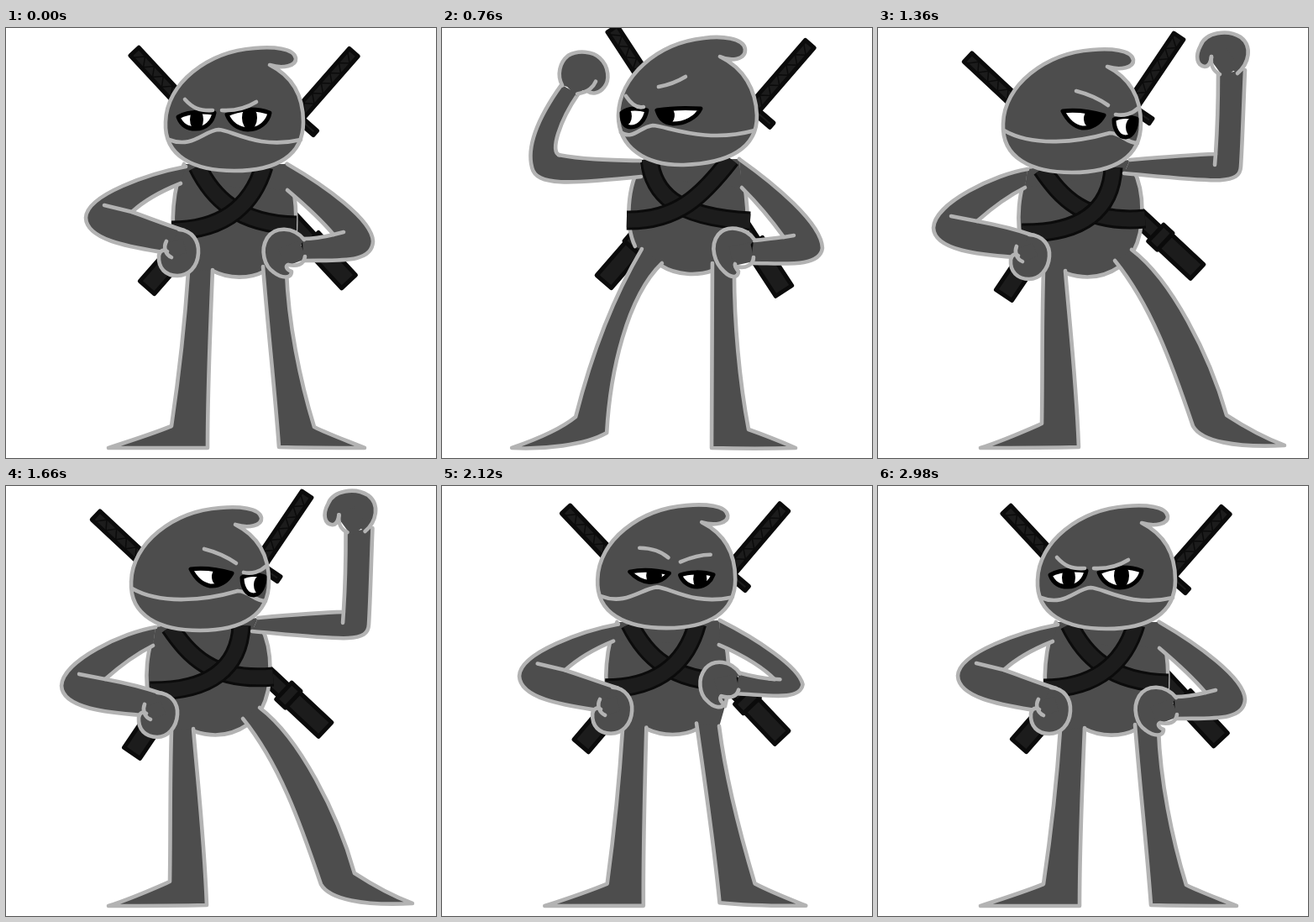
Animation of 512 by 512 pixels, one loop 3 s. Source, as an HTML page with a canvas:

```html
<!DOCTYPE html>
<html lang="en">
<head>
<meta charset="utf-8">
<title>Ninja flex</title>
<style>
html, body { margin: 0; width: 100%; height: 100%; overflow: hidden; background: #fff; }
canvas { display: block; width: 512px; height: 512px; }
</style>
</head>
<body>
<canvas id="stage" width="512" height="512"></canvas>
<script>
const ctx = document.getElementById('stage').getContext('2d');
const LOOP = 3000, SKIN = '#4d4d4d', LINE = '#b3b3b3', CLOTH = '#1c1c1c', EDGE = '#0b0b0b';

const linear = u => u;
const easeIn = u => u * u;
const easeOut = u => 1 - (1 - u) ** 2;
const easeBoth = u => u * u * (3 - 2 * u);

// Body poses: front, left arm up, left arm flexed, right arm up, right arm flexed
const FRONT = 0, LUP = 1, LFLEX = 2, RUP = 3, RFLEX = 4;
const bodyKeys = [
  [0, FRONT], [360, LUP, easeBoth], [540, LUP], [760, LFLEX, easeIn], [1060, FRONT, linear],
  [1360, RUP, easeOut], [1640, RUP], [1900, RFLEX, easeIn], [2260, FRONT, easeOut], [LOOP, FRONT]
];
// Faces: angry, looking left, looking right, sleepy
const ANGRY = 0, LEFT = 1, RIGHT = 2, SLEEPY = 3;
const faceKeys = [
  [0, ANGRY], [300, LEFT, easeBoth], [780, LEFT], [1060, ANGRY, easeIn], [1340, RIGHT, easeOut],
  [1920, RIGHT], [2300, SLEEPY, easeBoth], [2480, SLEEPY], [2940, ANGRY, easeBoth], [LOOP, ANGRY]
];

const headFront = 'M314 44C330 49 346 45 345 36C343 24 318 22 296 24C240 28 191 66 190 112' +
  'C188 153 224 170 272 170C322 170 354 152 354 112C354 82 342 58 314 44Z';
const headLeft = 'M311 42C324 48 342 46 341 33C339 20 313 17 292 20C236 26 191 66 190 112' +
  'C190 150 222 172 268 171C320 169 356 152 355 112C354 82 340 56 311 42Z';

const body = {
  headAt: ['0 0', '31 -4', '20 -8', '-41 2', '-32 -6'],
  look: ['0 0', '0 0', '0 1', '0 0', '-11 0'],
  head: [headFront, headLeft, headLeft, headFront, headFront],
  swordA: ['153 28 408 302', '214 4 415 318', '203 1 407 313', '107 35 380 290', '116 27 385 285'],
  swordB: ['414 29 168 309', '453 31 198 302', '438 19 193 302', '358 10 150 318', '370 4 153 311'],
  torso: [
    'M212 162C198 190 196 235 202 260L217 291L246 289C265 299 290 299 307 290L334 291L342 262C348 235 346 190 334 162',
    'M246 162C228 190 225 235 236 262L243 265L266 283C285 297 312 297 328 290L355 296L372 262C376 235 376 190 366 160',
    'M238 160C220 188 218 235 230 260L238 264L261 283C280 295 305 295 322 289L348 292L362 262C366 235 364 195 354 156',
    'M182 166C166 190 164 235 172 258L197 291L224 292C250 301 272 295 288 284L302 264L304 266C318 240 318 195 304 168',
    'M188 162C174 190 172 235 180 258L204 287L229 290C250 295 272 294 290 283L307 262L308 264C325 235 324 195 308 162'
  ],
  strapA: [
    'M228 165C245 200 275 234 346 235', 'M257 163C262 195 285 232 375 237', 'M247 156C251 195 275 225 367 230',
    'M195 168C217 200 245 234 318 227', 'M199 160C221 201 255 232 322 221'
  ],
  strapB: [
    'M307 165C295 205 265 241 197 241', 'M350 163C320 205 290 232 226 231', 'M344 156C310 200 280 230 220 229',
    'M280 166C278 215 245 245 171 244', 'M285 158C280 205 250 240 178 240'
  ],
  legL: [
    'M217 290C213 350 205 420 197 474C175 483 150 491 122 500C160 500 200 500 240 500C240 430 243 360 246 288',
    'M243 264C205 320 170 380 145 457C125 473 95 487 66 498C110 502 160 492 182 473C190 410 215 320 267 281',
    'M238 263C207 315 180 380 159 463C142 477 112 490 83 500C120 502 170 497 196 482C200 410 220 320 262 280',
    'M197 290C195 350 196 410 195 471C170 482 150 491 122 500C160 500 200 500 239 499C236 420 228 350 223 289',
    'M204 285C201 350 199 410 195 471C170 482 150 491 124 500C160 500 200 500 239 499C236 420 232 350 228 285'
  ],
  legR: [
    'M306 284C312 360 320 430 325 499C360 500 400 500 427 500C405 491 385 484 367 475C350 420 336 350 334 290',
    'M328 283C328 360 324 430 323 499C360 500 395 500 425 499C405 491 385 484 370 478C360 410 358 350 355 298',
    'M322 280C321 360 322 430 321 500C355 501 390 501 421 500C400 491 385 485 365 478C354 420 348 350 348 292',
    'M282 277C325 330 350 400 375 474C385 492 425 500 484 497C460 488 435 474 415 461C395 390 350 300 302 264',
    'M286 274C320 325 345 400 362 480C380 497 420 500 469 498C445 490 425 478 404 464C385 390 345 310 307 262'
  ],
  armL: [
    'M214 165C172 173 96 198 95 226C96 253 150 261 186 267L212 241C190 234 170 226 150 219C165 205 188 193 208 185',
    'M243 162C200 168 165 167 143 167C122 166 121 130 121 86L92 85C92 130 95 195 130 200C165 201 200 195 245 180',
    'M236 158C195 157 165 156 140 151C128 148 140 110 162 78L142 67C115 105 100 140 107 166C112 188 150 186 237 177',
    'M178 168C140 174 67 208 66 238C67 265 122 270 162 273L185 247C165 240 140 234 118 230C135 215 155 200 175 190',
    'M186 162C150 166 75 200 75 228C77 256 130 262 168 266L193 238C170 231 150 226 127 221C145 206 165 190 182 182'
  ],
  creaseL: ['M150 219L117 211', 'M143 167L142 167', 'M140 151L139 151', 'M118 230L87 224', 'M127 221L95 215'],
  bicep: [
    'M214 165C214 165 214 165 214 165', 'M160 168C168 154 190 154 206 170', 'M236 158C236 158 236 158 236 158',
    'M178 168C178 168 178 168 178 168', 'M186 162C186 162 186 162 186 162'
  ],
  fistL: [
    'M206 240C222 241 230 254 229 268C228 285 217 295 204 295C190 295 181 286 182 271C183 265 188 263 192 266',
    'M94 88C82 80 80 60 86 48C92 32 112 26 125 31C140 36 147 50 144 63C141 80 130 86 125 78',
    'M143 68C136 55 140 40 150 32C162 25 180 27 188 35C199 45 200 62 193 70C187 78 178 78 174 75',
    'M180 246C197 247 205 259 204 272C203 288 192 299 180 299C166 299 157 290 158 276C159 270 163 268 167 271',
    'M186 238C202 238 211 252 210 266C209 282 198 293 185 293C171 293 162 284 163 270C164 264 168 262 172 265'
  ],
  thumbL: [
    'M197 273C190 270 187 261 191 254', 'M124 62C123 72 122 80 117 87', 'M183 63C180 70 175 75 161 78',
    'M172 278C165 275 162 267 165 260', 'M178 272C171 268 168 261 171 254'
  ],
  armR: [
    'M335 162C380 188 436 228 437 254C436 281 395 276 354 277L353 251C366 251 378 249 390 246C375 228 355 210 335 193',
    'M364 160C405 190 462 240 463 268C460 292 415 286 377 286L380 258C393 257 405 255 417 253C400 230 385 212 367 196',
    'M354 156C395 185 452 232 453 262C450 286 405 280 368 280L371 253C385 252 395 250 407 249C392 228 375 208 357 190',
    'M300 157C335 154 370 151 402 150C404 120 405 85 405 55L437 50C435 95 434 135 432 165C431 188 400 183 293 173',
    'M306 148C335 143 362 139 387 135C372 115 352 95 334 77L354 58C380 85 410 115 430 140C445 168 405 163 300 167'
  ],
  creaseR: ['M390 246L402 243', 'M417 253L429 253', 'M407 249L419 247', 'M402 150L401 163', 'M387 135L405 157'],
  fistR: [
    'M355 252C342 236 320 236 311 250C302 265 308 284 319 291C328 298 340 299 340 290C334 288 332 283 336 282',
    'M380 256C370 241 347 238 337 250C326 264 332 282 344 292C352 300 361 301 361 293C358 289 356 286 357 284',
    'M372 252C362 237 339 234 329 246C318 260 325 280 336 290C344 298 353 298 353 290C350 286 348 283 349 281',
    'M428 54C442 42 446 22 432 11C416 1 390 5 384 21C377 34 380 45 389 46C394 46 396 42 397 34',
    'M353 60C357 45 345 32 328 31C312 31 300 42 297 55C293 68 300 78 310 80C316 81 320 77 313 68'
  ],
  thumbR: [
    'M336 282C346 284 355 282 356 272', 'M360 288C370 291 380 286 379 277', 'M351 284C361 287 371 282 371 273',
    'M397 34C396 44 398 51 407 55', 'M312 69C320 75 328 78 337 75'
  ],
  mask: [
    'M194 133C222 144 236 122 253 121C268 121 300 145 351 133',
    'M193 132C207 142 215 126 231 124C249 125 294 147 353 130',
    'M193 132C207 142 215 126 231 124C249 125 294 146 352 130',
    'M191 120C226 140 279 134 317 123C331 123 336 135 350 135',
    'M193 126C232 141 276 130 304 123C318 124 330 135 346 135'
  ]
};

const face = {
  eyeL: [
    'M205 106C215 100 230 99 248 101C246 112 238 120 226 120C214 120 208 114 205 106Z',
    'M194 108C201 102 213 102 224 105C222 116 215 125 205 125C197 125 194 118 194 108Z',
    'M261 97C279 95 296 98 310 102C305 111 296 118 284 117C273 115 266 107 261 97Z',
    'M204 108C216 104 235 104 249 107C243 112 236 114 228 114C218 114 211 112 204 108Z'
  ],
  eyeR: [
    'M263 103C278 96 298 95 314 101C312 112 302 121 288 121C274 120 267 113 263 103Z',
    'M236 105C254 102 272 102 288 103C283 114 269 121 255 121C243 120 239 114 236 105Z',
    'M322 107C329 103 338 102 349 106C349 116 345 127 336 128C327 128 322 118 322 107Z',
    'M263 107C275 103 300 103 313 107C308 112 300 115 289 115C278 115 268 112 263 107Z'
  ],
  pupilL: ['227 109 8 13', '199 112 7 11', '297 106 11 12', '227 109 8 13'],
  pupilR: ['290 107 9 14', '246 111 11 12', '343 116 7 11', '289 108 9 14'],
  browL: [
    'M213 85C222 95 230 99 246 98', 'M199 88C205 97 212 103 220 101',
    'M277 73C293 77 305 83 315 90', 'M212 76C222 73 236 75 243 83'
  ],
  browR: [
    'M257 98C272 99 285 96 298 88', 'M238 77C249 75 260 71 270 65',
    'M324 101C334 103 344 100 350 94', 'M262 83C275 72 292 68 306 73'
  ]
};

const number = /-?[\d.]+/g;

function mix(a, b, u) {
  const ends = b.match(number);
  let i = 0;
  return a.replace(number, v => (+v + (ends[i++] - v) * u).toFixed(2));
}

// Blend every part between the two keys around time t
function sample(parts, keys, t) {
  const k = keys.findIndex(key => key[0] > t);
  const [t0, from] = keys[k - 1], [t1, to, ease = linear] = keys[k];
  const u = ease((t - t0) / (t1 - t0));
  const out = {};
  for (const name in parts) out[name] = mix(parts[name][from], parts[name][to], u);
  return out;
}

const values = s => s.match(number).map(Number);

function stroke(d, color = LINE, width = 4.6, cap = 'round') {
  ctx.strokeStyle = color;
  ctx.lineWidth = width;
  ctx.lineCap = cap;
  ctx.lineJoin = 'round';
  ctx.stroke(new Path2D(d));
}

function fill(d, color = SKIN) {
  ctx.fillStyle = color;
  ctx.fill(new Path2D(d));
}

// Fill the whole shape, but leave its straight joins without an outline
function limb(d) {
  fill(d);
  stroke(d.replace(/L/g, 'M'));
}

function bar(x, length, width) {
  ctx.beginPath();
  ctx.rect(x, -width / 2, length, width);
  ctx.fill();
  ctx.stroke();
}

function sword(line) {
  const [x0, y0, x1, y1] = values(line);
  const size = Math.hypot(x1 - x0, y1 - y0);
  ctx.save();
  ctx.translate(x0, y0);
  ctx.rotate(Math.atan2(y1 - y0, x1 - x0));
  ctx.fillStyle = CLOTH;
  ctx.strokeStyle = EDGE;
  ctx.lineWidth = 5;
  ctx.lineJoin = 'round';
  bar(0, size * 0.28, 14);
  bar(size * 0.3, size * 0.55, 18);
  bar(size * 0.86, size * 0.14, 23);
  bar(size * 0.82, size * 0.04, 27);
  bar(size * 0.265, 7, 58);
  ctx.lineWidth = 1.5;
  ctx.beginPath();
  for (let x = 5, side = 5; x < size * 0.25; x += 8, side = -side) ctx.lineTo(x, side);
  ctx.stroke();
  ctx.restore();
}

function strap(d) {
  stroke(d, EDGE, 23, 'butt');
  stroke(d, CLOTH, 17, 'butt');
}

function eye(d, pupil) {
  const [x, y, rx, ry] = values(pupil);
  fill(d, '#fff');
  ctx.save();
  ctx.clip(new Path2D(d));
  ctx.fillStyle = '#000';
  ctx.beginPath();
  ctx.ellipse(x, y, rx, ry, 0, 0, Math.PI * 2);
  ctx.fill();
  ctx.restore();
  stroke(d, '#000', 5);
}

function drawHead(b, f) {
  ctx.save();
  ctx.translate(...values(b.headAt));
  limb(b.head);
  stroke(b.mask);
  ctx.translate(...values(b.look));
  eye(f.eyeL, f.pupilL);
  eye(f.eyeR, f.pupilR);
  stroke(f.browL);
  stroke(f.browR);
  ctx.restore();
}

// Close the space between both arm roots
function shoulders(b) {
  const l = values(b.armL), r = values(b.armR);
  fill(`M${l.slice(0, 2)}L${r.slice(0, 2)}L${r.slice(-2)}L${l.slice(-2)}Z`);
}

// Join the open wrist to the middle of the fist
function wrist(arm, fist) {
  const [x0, y0, x1, y1] = values(arm).slice(12, 16);
  const p = values(fist);
  const middle = k => p.filter((v, i) => i % 2 === k).reduce((a, v) => a + v) * 2 / p.length;
  stroke(`M${(x0 + x1) / 2} ${(y0 + y1) / 2}L${middle(0)} ${middle(1)}`, SKIN, 23, 'butt');
}

function drawArm(b, side) {
  const arm = b['arm' + side], fist = b['fist' + side];
  limb(arm);
  stroke(b['crease' + side]);
  if (side === 'L') limb(b.bicep);
  fill(fist);
  wrist(arm, fist);
  stroke(fist);
  stroke(b['thumb' + side]);
}

function draw(t) {
  const b = sample(body, bodyKeys, t);
  const f = sample(face, faceKeys, t);
  ctx.fillStyle = '#fff';
  ctx.fillRect(0, 0, 512, 512);
  sword(b.swordA);
  sword(b.swordB);
  limb(b.torso);
  shoulders(b);
  strap(b.strapA);
  strap(b.strapB);
  limb(b.legL);
  limb(b.legR);
  drawHead(b, f);
  drawArm(b, 'L');
  drawArm(b, 'R');
}

const start = performance.now();
function frame() {
  draw((performance.now() - start) % LOOP);
  requestAnimationFrame(frame);
}
frame();
</script>
</body>
</html>
```
